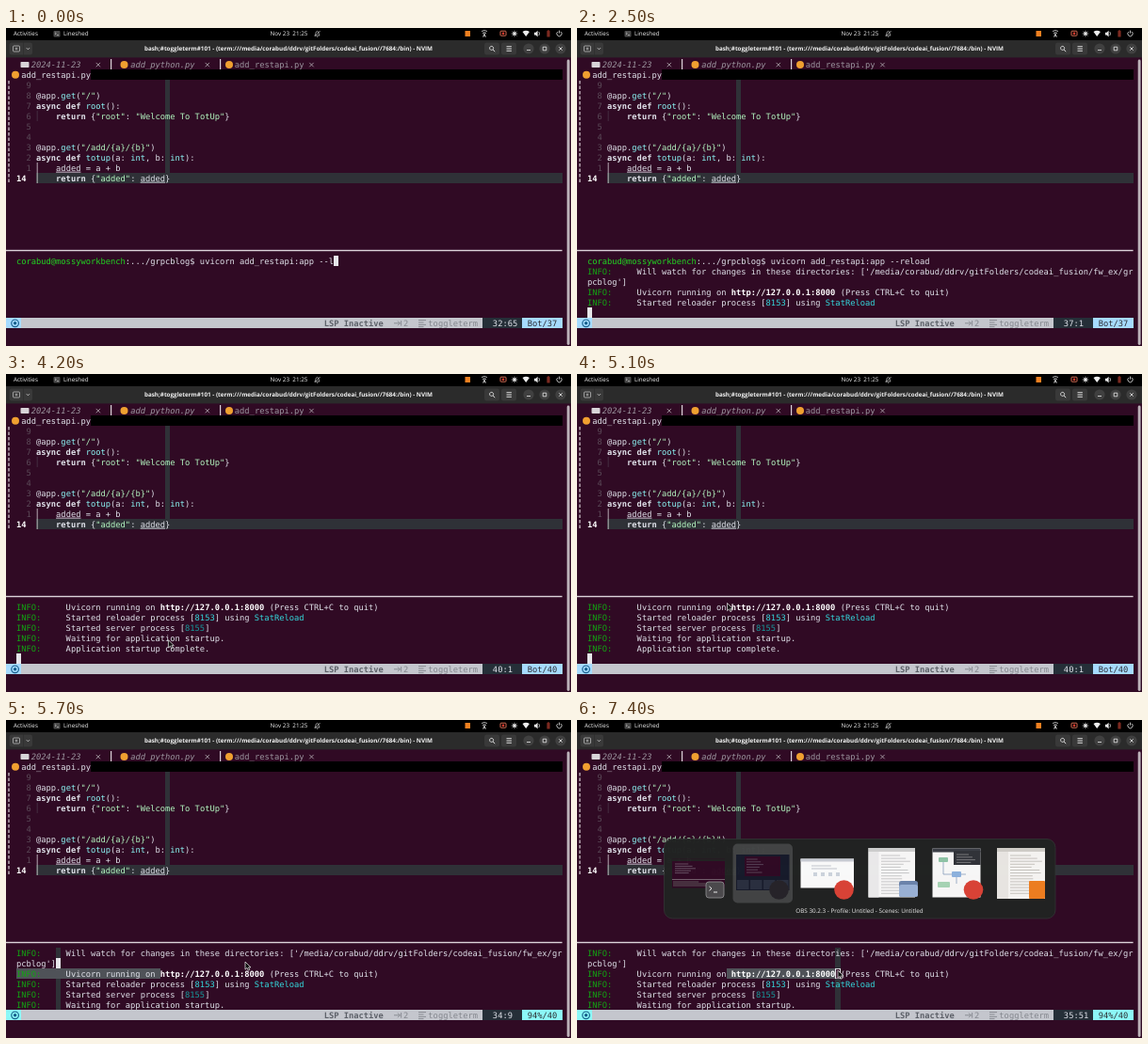
Write an HTML page that moves like this. It is 600 by 338 pixels and loops after 8000 ms.

```html
<!DOCTYPE html>
<html lang="en">
<head>
<meta charset="utf-8">
<style>
html, body { margin: 0; width: 100%; height: 100%; overflow: hidden; background: #300a24; }
svg { display: block; width: 100%; height: 100%; }
text { white-space: pre; text-rendering: geometricPrecision; font: 8.754px "DejaVu Sans Mono", monospace; fill: #e0e2ea; }
text.ui { font: 6.3px "Open Sans", "Noto Sans", sans-serif; fill: #f2f2f2; }
text.title { font-weight: 700; }
.b, .B { font-weight: 700; }
.B { fill: #fff; }
.c { fill: #8cf8f7; }
.s { fill: #b3f6c0; }
.u { text-decoration: underline; }
.C { fill: #34d8dc; }
.t { fill: #179a9c; }
.p { fill: #22d422; }
.i { fill: #12a612; }
.n { fill: #5b4a58; }
.d { fill: #9b959e; }
.it { fill: #9b959e; font-style: italic; }
.k { fill: #2c2e33; }
.g { fill: #5c6068; font-weight: 700; }
.l { fill: #84878e; }
</style>
</head>
<body>
<svg viewBox="0 0 600 338" preserveAspectRatio="none">
  <g id="base"></g>
  <g id="shell"></g>
  <g id="status"></g>
  <g id="mouse"></g>
  <g id="switcher"></g>
</svg>
<script>
const LOOP = 8000, STEP = 100, CW = 5.27, RH = 11;
const $ = id => document.getElementById(id);
const X = col => 0.4 + col * CW;
const Y = row => 0.3 + row * RH;

const rect = (x, y, w, h, fill, rx = 0, extra = '') =>
  `<rect x="${x}" y="${y}" width="${w}" height="${h}" fill="${fill}" rx="${rx}" ${extra}/>`;
const disc = (x, y, r, fill) => `<circle cx="${x}" cy="${y}" r="${r}" fill="${fill}"/>`;
const line = (d, color = '#eee', w = 0.9, extra = '') =>
  `<path d="${d}" fill="none" stroke="${color}" stroke-width="${w}" ${extra}/>`;
const ui = (x, y, s, cls = '', anchor = 'start') =>
  `<text class="ui ${cls}" x="${x}" y="${y}" text-anchor="${anchor}">${s}</text>`;

// Grid cells with their edges on whole pixels.
function cells(col, row, n, fill, rows = 1) {
  const x = Math.round(X(col)), y = Math.round(Y(row));
  return rect(x, y, Math.round(X(col + n)) - x, rows * RH, fill);
}

// Runs are separated by "|"; the first word of each run is its class.
const runs = s => s.split('|').map(r => {
  const cut = r.indexOf(' ');
  return `<tspan class="${r.slice(0, cut)}">${r.slice(cut + 1)}</tspan>`;
}).join('');
const text = (col, row, s) => `<text x="${X(col)}" y="${Y(row) + 8.4}">${runs(s)}</text>`;
const plain = s => s.split('|').map(r => r.slice(r.indexOf(' ') + 1)).join('');

const ORANGE = '#f0a030', CURSOR_BG = '#2f3137', SELECT = '#4f5258', PALE = '#dcd3d9';

function topBar() {
  let s = rect(0, 0, 600, 13, '#000') + ui(8, 8.4, 'Activities') + ui(61, 8.4, 'Lineshed');
  s += rect(50.5, 3, 7, 6.5, '#4a4a4a', 1) + line('M52 4.6l1.3 1.2-1.3 1.2M54 7.6h2', '#ddd', 0.6);
  s += ui(300.5, 8.4, 'Nov 23  21:25', '', 'middle');
  s += line('M328 8h5c-1-1-.6-4.6-2.5-4.6S329 7 328 8M330 9.3h1M327.6 9l6-6', '#ccc', 0.7);
  s += rect(487.5, 3, 5.5, 6, '#f08020');
  s += line('M505 3.5q3-2 6 0M506 5.5q2-1.5 4 0M508 5.5v4M506.5 9.5l1.5-3 1.5 3', '#ddd', 0.8);
  s += rect(525, 3.2, 6, 5, 'none', 0.8, 'stroke="#e8785c" stroke-width=".9"') + disc(528, 5.7, 1.3, '#e33b2e');
  s += disc(540, 6, 1.7, '#eee') + line('M540 2.6v6.8M536.6 6h6.8M537.6 3.6l4.8 4.8M542.4 3.6l-4.8 4.8', '#eee', 0.6);
  s += '<path d="M548.5 4q3.7-2.6 7.4 0l-3.7 5z" fill="#eee"/>';
  s += '<path d="M561 4.7h1.6l2-2v6.8l-2-2H561z" fill="#eee"/>' + line('M565.8 4q1.6 2 0 4', '#eee', 0.7);
  s += rect(574.4, 3, 3.2, 6.6, '#7d2a20', 0.6) + rect(575.2, 2.2, 1.6, 1, '#7d2a20');
  s += line('M586 4a2.6 2.6 0 1 0 3 0M587.5 2.6v3', '#eee', 0.8);
  return s;
}

function titleBar() {
  let s = rect(0, 13, 600, 18.4, '#2b2b2b') + rect(3.5, 15.5, 24.5, 13, '#393939', 2.5);
  s += line('M18.5 15.5v13', '#2b2b2b', 0.6) + rect(7.5, 19, 7, 6, 'none', 1, 'stroke="#ccc" stroke-width=".7"');
  s += line('M11 20.6v2.8M9.6 22h2.8', '#ccc', 0.7) + line('M21.8 21.2l1.6 1.6 1.6-1.6', '#ddd', 0.8);
  s += ui(300, 24.3, 'bash;#toggleterm#101 - (term:///media/corabud/ddrv/gitFolders/codeai_fusion//7684:/bin) - NVIM', 'title', 'middle');
  s += rect(508, 15.5, 16, 13, '#393939', 2.5) + rect(526, 15.5, 16, 13, '#393939', 2.5);
  s += line('M517.2 23l2 2.2M515.6 19.4a2 2 0 1 0 .01 0') + line('M531.5 19.7h5.4M531.5 22h5.4M531.5 24.3h5.4');
  for (const x of [555, 572, 589]) s += disc(x, 22, 5.6, '#404040');
  return s + line('M553 23.5h4M570.2 20.2h3.6v3.6h-3.6zM587.3 20.3l3.4 3.4M590.7 20.3l-3.4 3.4', '#eee', 0.8);
}

function tabs() {
  const cross = col => {
    const x = X(col) + 0.4, y = Y(3) + 3.6;
    return line(`M${x} ${y}l4.4 4.4M${x + 4.4} ${y}l-4.4 4.4`, '#aaa0a8', 0.9);
  };
  let s = rect(15.5, 36, 9, 6, '#d8d4d8', 0.8) + text(5, 3, 'it 2024-11-23') + cross(18);
  s += text(25, 3, 'it add_python.py') + cross(40) + text(46, 3, 'd add_restapi.py') + cross(61);
  for (const c of [21, 43]) s += rect(Math.floor(X(c)), 33, 1.2, RH, PALE);
  for (const x of [125.5, 237]) s += disc(x, 39, 4, ORANGE);
  return s + cells(17, 4, 95, '#000') + disc(10, 49.8, 4, ORANGE) + text(3, 4, 'w add_restapi.py');
}

const CODE = [
  '', 'w @app.|c get|w (|s "/"|w )', 'b async def |c root|w ():',
  'b     return |w {|s "root"|w : |s "Welcome To TotUp"|w }', '', '',
  'w @app.|c get|w (|s "/add/{a}/{b}"|w )',
  'b async def |c totup|w (a: |c int|w , b: |c int|w ):',
  'w     |u added|w  = a + b',
  'b     return |w {|s "added"|w : |u added|w }'
];

function editor() {
  let s = cells(32, 5, 1, CURSOR_BG, 9) + cells(6, 14, 106, CURSOR_BG);
  s += line('M3 55V165', PALE, 1.2, `stroke-dasharray="3.7 ${RH / 2 - 3.7}" stroke-dashoffset="-.9"`);
  s += line('M33.2 88v11', '#4b3548', 0.8) + line('M33.2 143v22', PALE, 0.8);
  CODE.forEach((c, i) => {
    s += i < 9 ? text(4, 5 + i, 'n ' + (9 - i)) : text(2, 14, 'B 14');
    if (c) s += text(6, 5 + i, c);
  });
  s += rect(0, 235.8, 590.6, 1.4, PALE);
  return s + rect(595.7, 33.5, 2.9, 303.5, '#bdb3ba', 1.4);
}

// Shell buffer, numbered from line 32.
const FIRST = 32;
const info = s => 'i INFO:|w      ' + s;
const OUT = [
  info("Will watch for changes in these directories: ['/media/corabud/ddrv/gitFolders/codeai_fusion/fw_ex/gr"),
  "w pcblog']",
  info('Uvicorn running on |B http://127.0.0.1:8000|w  (Press CTRL+C to quit)'),
  info('Started reloader process [|C 8153|w ] using |C StatReload'),
  info('Started server process [|t 8155|w ]'),
  info('Waiting for application startup.'),
  info('Application startup complete.')
];
const ANCHOR = { row: 35, col: 29 };

const count = (t, times) => times.filter(x => t >= x).length;
const typed = t => t < 200 ? 'l' : 'reload'.slice(0, count(t, [400, 500, 700, 800, 1000, 1100]));

const PATH = [
  [2700, 560, 210], [3500, 175, 281], [4400, 172, 283], [5100, 159.5, 243.5],
  [5300, 160, 245], [5700, 254, 257], [6000, 270, 265], [6200, 281, 266], [6300, 277, 266]
];
function mouseAt(t) {
  if (t < PATH[0][0]) return null;
  const i = PATH.findIndex(p => p[0] > t);
  if (i < 0) { const [, x, y] = PATH[PATH.length - 1]; return { x, y }; }
  const [t0, x0, y0] = PATH[i - 1], [t1, x1, y1] = PATH[i];
  const u = (t - t0) / (t1 - t0), e = u * u * (3 - 2 * u);
  return { x: x0 + (x1 - x0) * e, y: y0 + (y1 - y0) * e };
}

function state(t) {
  const shown = t < 1600 ? 0 : t < 1700 ? 2 : t < 1900 ? 3 : t < 3900 ? 4 : 7;
  const top = t < 3900 ? 32 : t < 5500 ? 35 : 33;
  const lines = ['p corabud@mossyworkbench|w :.../grpcblog$ uvicorn add_restapi:app --' + typed(t), ...OUT.slice(0, shown)];
  const mouse = mouseAt(t);
  const mode = t < 5300 ? 'insert' : t < 5400 ? 'normal' : 'visual';
  const under = mouse && {
    row: top + Math.floor((mouse.y - Y(22)) / RH),
    col: Math.floor((mouse.x - X(2)) / CW) + 1
  };
  let cur;
  if (mode === 'visual') {
    const len = plain(lines[under.row - FIRST]).length;
    cur = { row: under.row, col: Math.min(under.col, len + 1) };
  } else if (mode === 'normal') cur = ANCHOR;
  else if (t < 1400) cur = { row: FIRST, col: plain(lines[0]).length + 1 };
  else cur = { row: FIRST + 1 + shown, col: 1 };
  const hover = mode === 'insert' && under && under.row === 35 && under.col > 29 && under.col < 51;
  return { t, top, lines, mouse, mode, cur, hover, focus: t < 6900 };
}

function shell({ top, lines, mode, cur, hover, focus }) {
  let s = '';
  if (mode !== 'insert') s += cells(cur.col + 1, 22, 1, CURSOR_BG, 6);
  if (mode === 'visual') {
    const back = cur.row < ANCHOR.row || (cur.row === ANCHOR.row && cur.col < ANCHOR.col);
    const [a, b] = back ? [cur, ANCHOR] : [ANCHOR, cur];
    for (let r = a.row; r <= b.row; r++) {
      const from = r === a.row ? a.col : 1;
      const to = r === b.row ? b.col : plain(lines[r - FIRST]).length + 1;
      s += cells(from + 1, 22 + r - top, to - from + 1, SELECT);
    }
  }
  const row = 22 + cur.row - top;
  s += cells(cur.col + 1, row, 1, '#e6e6ea');
  // The block is hollow while the window has no focus.
  if (!focus) s += rect(X(cur.col + 1) + 0.7, Y(row) + 0.6, CW - 1.4, RH - 1.4, '#300a24');
  for (let k = 0; k < 6; k++) {
    const l = lines[top + k - FIRST];
    if (l) s += text(2, 22 + k, l);
  }
  if (hover) s += rect(X(31), Y(22 + 35 - top) + 9.6, 21 * CW, 0.9, '#fff');
  return s;
}

function statusBar({ t, cur, mode }) {
  let pos = `${cur.row}:${cur.col}`;
  if (t < 1400) {
    // The ruler trails the typing by one step.
    const n = t < 400 ? 1 : typed(t - STEP).length;
    pos = `32:${64 + n}`;
  } else if (t < 2500) pos = '32:70';
  else if (t < 4200) pos = '37:1';
  const place = mode === 'visual' ? '94%/40' : t < 4200 ? 'Bot/37' : 'Bot/40';
  const tint = mode === 'visual' ? '#8cf8f7' : '#a6dbff';
  let s = cells(0, 28, 96, '#c4c6cd') + cells(0, 28, 3, tint) + cells(96, 28, 8, '#252f38') + cells(104, 28, 8, tint);
  s += disc(9.6, 313.8, 1.7, '#155f8c') + '<circle cx="9.6" cy="313.8" r="3.8" fill="none" stroke="#155f8c" stroke-width="1.2"/>';
  s += text(64, 28, 'g LSP Inactive') + text(80, 28, 'l 2') + text(85, 28, 'l toggleterm');
  s += line('M412 313.8h6.4M416 311.4l2.4 2.4-2.4 2.4M419.6 311v5.6M438 310.6h8M438 313h5.5M438 315.4h8M438 317.6h5.5', '#84878e');
  return s + text(98, 28, 'w ' + pos) + text(105, 28, 'k ' + place);
}

function pointer({ mouse, hover }) {
  if (!mouse) return '';
  const [d, fill, edge] = hover
    ? ['M0 0q1.2-.8 1.6.6V3l3.2.9q1 .4.8 1.6L5 9H1.2L-1.6 5.4q.4-1 1.6 0z', '#f4f4f4', '#222']
    : ['M0 0V8.2L2 6.4 3.4 9.2 4.8 8.5 3.5 5.9H6z', '#111', '#f4f4f4'];
  return `<path transform="translate(${mouse.x} ${mouse.y})" d="${d}" fill="${fill}" stroke="${edge}" stroke-width=".7"/>`;
}

function switcher() {
  let s = rect(92.5, 126.5, 415.5, 84.5, '#212322', 9, 'stroke="#343636" stroke-width=".8"');
  s += rect(165.5, 131.5, 63.5, 63, '#434545', 5);
  const rows = (x, y, w, n, gap, color) => {
    let d = '';
    for (let i = 0; i < n; i++) d += `M${x} ${y + i * gap}h${w * (0.65 + 0.35 * Math.sin(i * 2.3) ** 2)}`;
    return line(d, color, 0.6);
  };
  // editor window
  s += rect(101, 147.5, 56, 31, '#300a24') + rect(101, 147.5, 56, 2.5, '#222') + rows(104, 153, 22, 5, 2.4, '#8a7f8c');
  s += line('M101 169.5h56', '#bbb', 0.5) + rows(102, 172, 42, 3, 2, '#7f8a80');
  s += rect(137, 172, 19, 17, '#4c4b4d', 3, 'stroke="#99979a" stroke-width=".8"') + line('M140.5 177l2.5 2.2-2.5 2.2M145 183h4', '#eee', 1);
  // recorder window
  s += rect(169, 143, 56.5, 38, '#171b2b') + rect(178, 145, 38, 21, '#300a24') + rows(180, 148, 18, 6, 2.8, '#73697a');
  for (let i = 0; i < 4; i++) s += rect(170 + i * 14, 170, 12.5, 10, '#2a3040');
  s += disc(214.5, 180.5, 10.3, '#26242a');
  // browser window
  s += rect(237.5, 147.5, 56.5, 31, '#fdfdfd') + rect(237.5, 147.5, 56.5, 3, '#c9ced6') + rows(249, 155, 32, 2, 3, '#9aa3b0');
  for (let i = 0; i < 4; i++) s += rect(251 + i * 8, 162, 4, 4, '#cfd6df');
  s += disc(283.5, 180.5, 10.3, '#dc4437');
  // file list
  s += rect(309.5, 136, 49.5, 52.5, '#fafafa') + rect(309.5, 136, 49.5, 4, '#d0d0d0') + rect(309.5, 140, 11, 48.5, '#ededed');
  s += rows(323, 144, 31, 14, 3.1, '#aaa') + rect(342, 171, 20, 17, '#6d86ad', 2.5) + rect(342, 175, 20, 13, '#9cb4d8', 2.5);
  // diagram page
  s += rect(377.5, 136.5, 51, 52, '#fafafa') + rect(377.5, 136.5, 51, 4, '#3b3f46') + rect(400, 139, 28.5, 15, '#32343a');
  s += rows(403, 143, 20, 4, 2.8, '#aaa') + line('M389 150v14h14v10M403 164h10', '#7d93b5', 0.7);
  s += rect(384, 146, 10, 5, '#8fc6a8', 1) + rect(398, 161, 10, 6, '#8fb4e0', 1) + rect(383, 172, 13, 6, '#a9d6b6', 1);
  s += disc(421, 180.5, 10.3, '#dc4437');
  // player list
  s += rect(446, 136, 51, 54, '#f8f7f5') + rect(446, 136, 51, 4, '#d2cfca') + rect(446, 140, 12, 50, '#ebe9e5');
  s += rows(460, 144, 34, 14, 3.1, '#aaa49c') + rect(480, 171, 17, 19, '#f08020', 1);
  return s + ui(300, 204.8, 'OBS 30.2.3 - Profile: Untitled - Scenes: Untitled', '', 'middle');
}

$('base').innerHTML = rect(0, 0, 600, 338, '#300a24') + topBar() + titleBar() + tabs() + editor();
$('switcher').innerHTML = switcher();

let last = -1;
function draw(now) {
  const t = Math.floor((now % LOOP) / STEP) * STEP;
  if (t === last) return;
  last = t;
  const st = state(t);
  $('shell').innerHTML = shell(st);
  $('status').innerHTML = statusBar(st);
  $('mouse').innerHTML = pointer(st);
  $('switcher').setAttribute('opacity', t < 7300 ? 0 : t < 7400 ? 0.6 : 0.98);
}
const start = performance.now();
function tick() {
  draw(performance.now() - start);
  requestAnimationFrame(tick);
}
tick();
</script>
</body>
</html>
```
